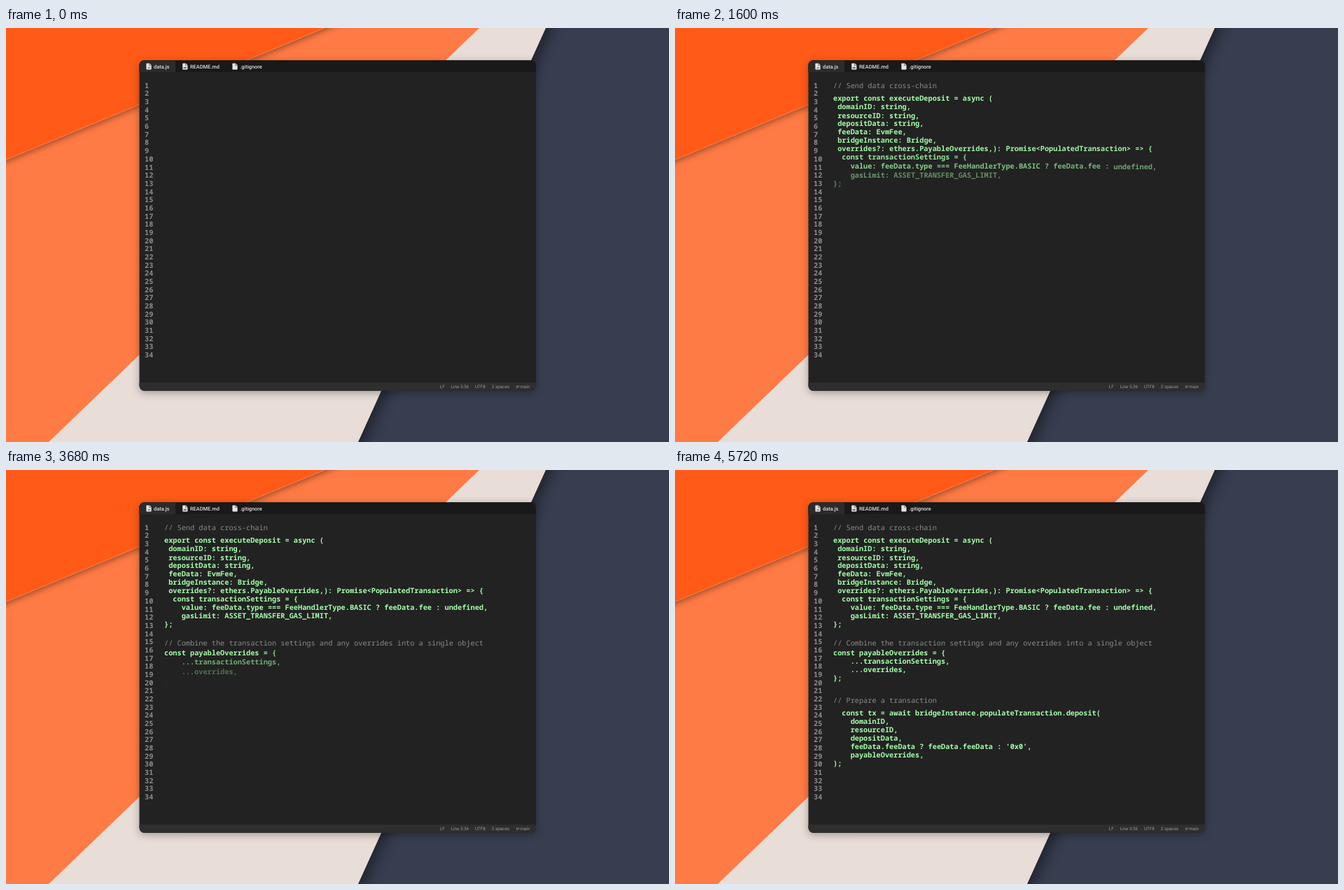
These frames come from a looping animation (947 by 592 pixels, 7280 ms). An HTML page:

```html
<!DOCTYPE html>
<html lang="en">
<head>
<meta charset="utf-8">
<title>Code editor</title>
<style>
  html, body { margin: 0; width: 100%; height: 100%; overflow: hidden; background: #373e50; }
  svg { display: block; width: 947px; height: 592px; }
  text { white-space: pre; text-rendering: geometricPrecision; }
  .mono { font: 600 10.27px "Noto Sans Mono", "DejaVu Sans Mono", monospace; }
  .code { fill: #a4ffaa; }
  .note { fill: #8b8b8b; font-weight: 500; }
  .gutter { fill: #8b8b8b; font-weight: 700; }
  .tab { font: 500 7.4px Roboto, Inter, sans-serif; fill: #dedede; }
  .status { font: 400 6.3px Roboto, Inter, sans-serif; fill: #999; }
  .badge { font: 700 3px Roboto, Inter, sans-serif; fill: #222; text-anchor: middle; }
  .beige { filter: drop-shadow(7px 3px 10px rgba(0, 0, 0, .45)); }
  .flame { filter: drop-shadow(1px 3px 4px rgba(70, 30, 10, .5)); }
  .window { filter: drop-shadow(0 3px 6px rgba(0, 0, 0, .3)); }
</style>
</head>
<body>
<svg viewBox="0 0 947 592">
  <defs>
    <clipPath id="frame"><rect x="190.5" y="46.3" width="566.5" height="472.5" rx="7"/></clipPath>
    <path id="page" d="M.8 0H4.6L7.2 2.6V8.2Q7.2 9 6.4 9H.8Q0 9 0 8.2V.8Q0 0 .8 0Z"/>
    <path id="fold" d="M4.3 .6V2.9H6.7" fill="none" stroke="#333" stroke-width=".6"/>
  </defs>

  <rect width="947" height="592" fill="#373e50"/>
  <path class="beige" d="M600-20H780.1L771 0L503 592L493.900 612H-20Z" fill="#e8ddd7"/>
  <path d="M0 0H676L61 592H0Z" fill="#ff7b45"/>
  <path class="flame" d="M-20-20H503.100L455 0L0 188.500L-20 196.800Z" fill="#ff5a17"/>
  <path d="M455 0L0 188.500" stroke="#ffa47e" stroke-width=".6"/>

  <rect class="window" x="190.500" y="46.300" width="566.500" height="472.500" rx="7" fill="#222"/>
  <g clip-path="url(#frame)">
    <rect x="190" y="46" width="568" height="17" fill="#191919"/>
    <rect x="190" y="46" width="52" height="17" fill="#2b2b2b"/>
    <rect x="190" y="507" width="568" height="12" fill="#2e2e2e"/>
  </g>

  <g id="icons" fill="#e4e4e4"></g>
  <g class="tab">
    <text x="211" y="57.500">data.js</text>
    <text x="263" y="57.500">README.md</text>
    <text x="334.300" y="57.500">.gitignore</text>
  </g>
  <g class="status">
    <text x="619.800" y="515.200">LF</text>
    <text x="635.700" y="515.200">Line 5:36</text>
    <text x="670" y="515.200">UTF8</text>
    <text x="693.800" y="515.200">2 spaces</text>
    <text x="734.300" y="515.200">main</text>
    <path d="M729.800 511V515.300M729.800 513.700H731Q732.400 513.700 732.400 512V511" fill="none" stroke="#999" stroke-width=".8"/>
  </g>
  <g id="gutter" class="mono gutter"></g>
  <g id="editor" class="mono"></g>
</svg>

<script>
  const LOOP = 7280, ADVANCE = 6.162, LEFT = 226, RISE = 7.5;

  // start, stagger and fade are in ms; nothing of a block shows before `from`.
  const blocks = [
    { kind: 'note', start: 10, from: 40, stagger: 90, fade: 400, lines: [
      [85.6, '// Send data cross-chain']] },
    { kind: 'code', start: 798, from: 1000, stagger: 18.5, fade: 600, lines: [
      [104.2, 'export const executeDeposit = async ('],
      [116.2, ' domainID: string,'],
      [128.5, ' resourceID: string,'],
      [140.4, ' depositData: string,'],
      [152.2, ' feeData: EvmFee,'],
      [164.1, ' bridgeInstance: Bridge,'],
      [176.4, ' overrides?: ethers.PayableOverrides,): Promise<PopulatedTransaction> => {'],
      [188.3, '  const transactionSettings = {'],
      [200.3, '    value: feeData.type === FeeHandlerType.BASIC ? feeData.fee : undefined,'],
      [212.2, '    gasLimit: ASSET_TRANSFER_GAS_LIMIT,'],
      [224, '};']] },
    { kind: 'note', start: 2521, from: 2560, stagger: 27, fade: 300, lines: [
      [250.6, '// Combine the transaction settings and any overrides into a single object']] },
    { kind: 'code', start: 3317, from: 3480, stagger: 60, fade: 330, lines: [
      [264.9, 'const payableOverrides = {'],
      [276.9, '    ...transactionSettings,'],
      [289.2, '    ...overrides,'],
      [301.2, '};']] },
    { kind: 'note', start: 4240, from: 4280, stagger: 60, fade: 400, lines: [
      [332.8, '// Prepare a transaction']] },
    { kind: 'code', start: 4515, from: 4515, stagger: 50, fade: 500, lines: [
      [351, '  const tx = await bridgeInstance.populateTransaction.deposit('],
      [362.9, '    domainID,'],
      [374.8, '    resourceID,'],
      [386.6, '    depositData,'],
      [398.5, "    feeData.feeData ? feeData.feeData : '0x0',"],
      [410.8, '    payableOverrides,'],
      [422.8, ');']] }
  ];

  function add(parent, tag, attrs, content = '') {
    const el = document.createElementNS('http://www.w3.org/2000/svg', tag);
    for (const key in attrs) el.setAttribute(key, attrs[key]);
    el.textContent = content;
    return parent.appendChild(el);
  }

  const byId = id => document.getElementById(id);

  [[200.4, 'JS'], [252.2, 'MD'], [323.4, '']].forEach(([x, label]) => {
    const icon = add(byId('icons'), 'g', { transform: `translate(${x} 50.500)` });
    add(icon, 'use', { href: '#page' });
    add(icon, 'use', { href: '#fold' });
    add(icon, 'text', { class: 'badge', x: 3.6, y: 7.3 }, label);
  });

  for (let n = 1; n <= 34; n++) {
    add(byId('gutter'), 'text', { x: 198, y: 85.8 + (n - 1) * 11.67 }, n);
  }

  const words = [];
  for (const block of blocks) {
    let index = 0;
    for (const [y, line] of block.lines) {
      for (const match of line.matchAll(/\S+/g)) {
        const x = LEFT + match.index * ADVANCE;
        const el = add(byId('editor'), 'text', { class: block.kind, x, y, opacity: 0 }, match[0]);
        words.push({ el, block, start: block.start + block.stagger * index++ });
      }
    }
  }

  function draw() {
    const time = performance.now() % LOOP;
    for (const { el, block, start } of words) {
      const raw = time < block.from ? 0 : (time - start) / block.fade;
      const left = 1 - Math.min(1, Math.max(0, raw));
      el.setAttribute('opacity', 1 - left ** 2);
      el.setAttribute('transform', `translate(0 ${RISE * left ** 4})`);
    }
    requestAnimationFrame(draw);
  }
  draw();
</script>
</body>
</html>
```
